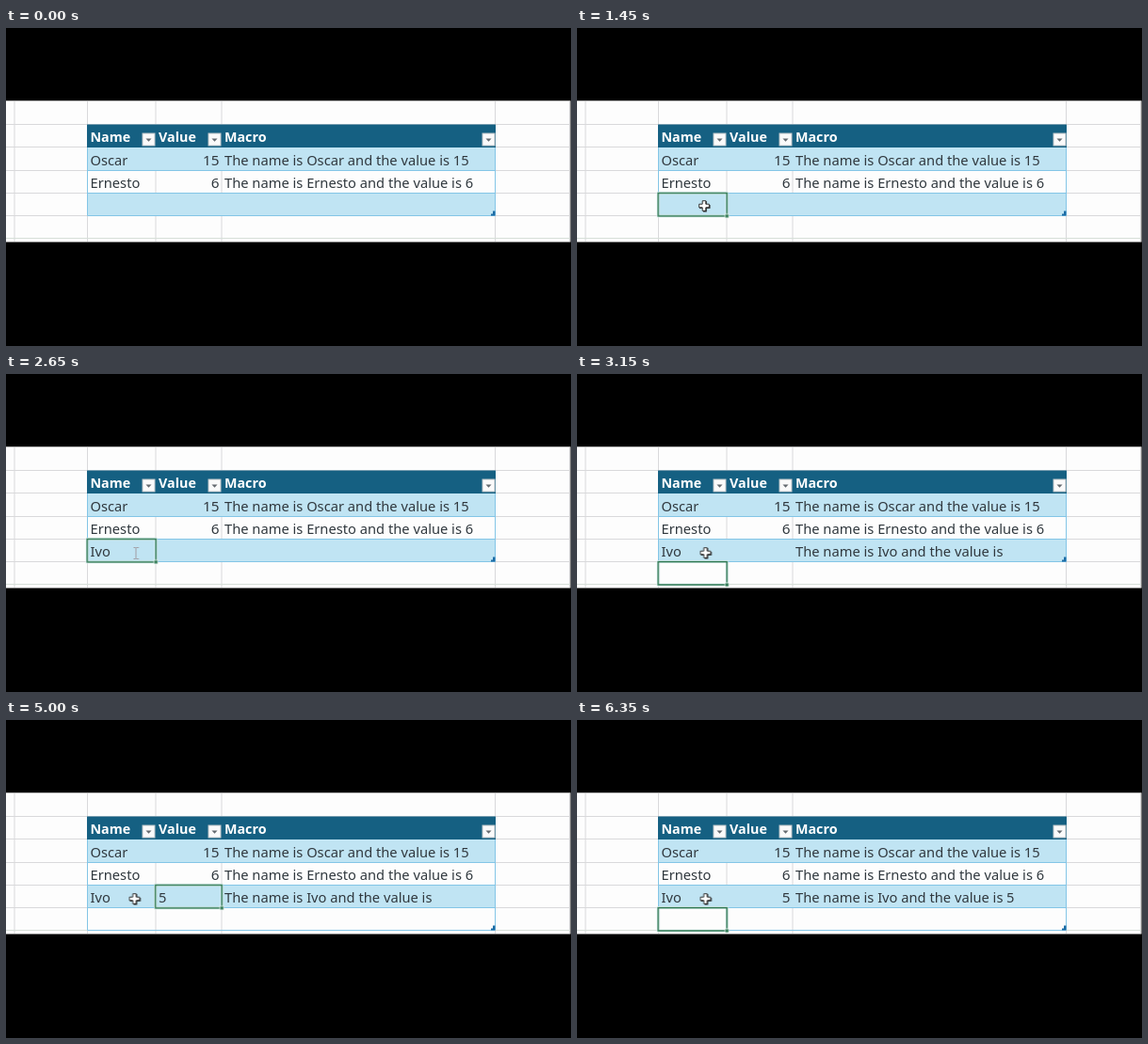
An HTML page that plays this animation: 600x338 px, repeating every 8 s.

```html
<!DOCTYPE html>
<html lang="en">
<head>
<meta charset="utf-8">
<title>Table with generated sentences</title>
<style>
  html, body { margin: 0; width: 100%; height: 100%; overflow: hidden; background: #000; }
  svg { display: block; }
  text { font: 14.7px "Noto Sans", "Open Sans", sans-serif; fill: #30383e; }
  .head text { font-size: 14.3px; font-weight: 700; fill: #fff; }
  .num { text-anchor: end; font-size: 15.3px; }
  .grid { stroke: #d9d9db; fill: none; }
  .edge { stroke: #83c5e6; fill: none; }

  .timed { animation: 8s step-end infinite; }
  #key1 { animation-name: key1; }
  #key2 { animation-name: key2; }
  #key3 { animation-name: key3; }
  #line { animation-name: line; }
  #digit { animation-name: digit; }
  #result { animation-name: result; }
  #short { animation-name: short; }
  #grown { animation-name: grown; }
  #cross { animation-name: cross; }
  #beam { animation-name: beam; }
  #mark { animation-name: mark; }

  @keyframes key1 { 0% { opacity: 0 } 26.875%, 100% { opacity: 1 } }
  @keyframes key2 { 0% { opacity: 0 } 28.75%, 100% { opacity: 1 } }
  @keyframes key3 { 0% { opacity: 0 } 30.625%, 100% { opacity: 1 } }
  @keyframes line { 0% { opacity: 0 } 34.375%, 100% { opacity: 1 } }
  @keyframes digit { 0% { opacity: 0 } 61.875% { opacity: 1 } 64.375%, 100% { opacity: 0 } }
  @keyframes result { 0% { opacity: 0 } 64.375%, 100% { opacity: 1 } }
  @keyframes short { 0% { opacity: 1 } 40.625%, 100% { opacity: 0 } }
  @keyframes grown { 0% { opacity: 0 } 40.625%, 100% { opacity: 1 } }
  @keyframes cross { 0% { opacity: 0 } 14.375% { opacity: 1 } 26.875% { opacity: 0 } 34.375%, 100% { opacity: 1 } }
  @keyframes beam { 0% { opacity: 0 } 26.875% { opacity: 1 } 34.375%, 100% { opacity: 0 } }
  @keyframes mark { 0% { opacity: 0 } 17.5%, 100% { opacity: 1 } }

  #pointer { animation: point 8s ease-out infinite; }
  @keyframes point {
    0%, 14.375% { transform: translate(196px, 216px) }
    17.5%, 18.75% { transform: translate(135px, 189px) }
    21.875%, 100% { transform: translate(136.5px, 190px) }
  }

  /* The selection hangs from its bottom right corner. */
  #cell { animation: move 8s cubic-bezier(.2, .6, .4, 1) infinite; }
  #cell .box { animation: size 8s cubic-bezier(.2, .6, .4, 1) infinite; }
  @keyframes move {
    0%, 34.375% { transform: translate(159.2px, 199.8px) }
    36.875%, 43.75% { transform: translate(159.2px, 224px) }
    46.375%, 46.75% { transform: translate(159.2px, 199.8px) }
    49.375%, 64.375% { transform: translate(229.2px, 199.8px) }
    66.875%, 76.25% { transform: translate(229.2px, 224px) }
    79.375%, 100% { transform: translate(159.2px, 224px) }
  }
  @keyframes size {
    0%, 46.75% { x: -73px; width: 73px }
    49.375%, 76.25% { x: -70.5px; width: 70.5px }
    79.375%, 100% { x: -73px; width: 73px }
  }
</style>
</head>
<body>
<svg width="600" height="338">
  <defs>
    <g id="filter">
      <rect x="-6.500" y="-6.500" width="13" height="13" fill="#fafafa" stroke="#bcc3c8"/>
      <path d="M-3-1H3L0 2.200Z" fill="#656b70"/>
    </g>
    <path id="corner" d="M515 199.500V197.500H517V194.500H519.500V199.500Z" fill="#1c6ca5"/>
  </defs>

  <rect y="77.300" width="599.500" height="150.200" fill="#fdfdfd"/>
  <path class="grid" d="M0 102.500H599M0 126.500H599M0 151.500H599M0 175.500H599M0 199.500H599M9 78V227M86.500 78V227M159 78V227M229 78V227M519.500 78V227M598.500 78V227"/>
  <path d="M0 223.500H599" stroke="#d6dfd8"/>

  <g class="head">
    <rect x="86" y="102.500" width="434" height="24.700" fill="#156082"/>
    <text x="89.500" y="121.400">Name</text>
    <text x="162" y="121.400">Value</text>
    <text x="232" y="121.400">Macro</text>
    <use href="#filter" x="151.500" y="118.500"/>
    <use href="#filter" x="221.500" y="118.500"/>
    <use href="#filter" x="512.500" y="118.500"/>
  </g>

  <path d="M86 127H520V151H86ZM86 175H520V199H86Z" fill="#c0e4f3"/>
  <path class="edge" d="M86.500 127V199.500H519.500V127M86 151.500H520M86 175.500H520"/>
  <use id="short" class="timed" href="#corner"/>
  <g id="grown" class="timed">
    <path class="edge" d="M86.500 199V223.500H519.500V199"/>
    <use href="#corner" y="24"/>
  </g>

  <text x="89.500" y="145.500">Oscar</text>
  <text class="num" x="226.500" y="145.500">15</text>
  <text x="232" y="145.500">The name is Oscar and the value is 15</text>
  <text x="89.500" y="169.500">Ernesto</text>
  <text class="num" x="226.500" y="169.500">6</text>
  <text x="232" y="169.500">The name is Ernesto and the value is 6</text>

  <text x="89.500" y="193.700"><tspan id="key1" class="timed">I</tspan></text>
  <text id="key2" class="timed" x="94.500" y="193.700">v</text>
  <text id="key3" class="timed" x="102" y="193.700">o</text>
  <text id="line" class="timed" x="232" y="193.700">The name is Ivo and the value is</text>
  <text id="digit" class="timed" x="162" y="193.700">5</text>
  <g id="result" class="timed">
    <text class="num" x="226.500" y="193.700">5</text>
    <text x="456" y="193.700">5</text>
  </g>

  <g id="mark" class="timed">
    <g id="cell" fill="none">
      <rect class="box" y="-24.400" height="24.400" stroke="#e4f3f5" stroke-width="3"/>
      <rect class="box" y="-24.400" height="24.400" stroke="#2b7750" stroke-width="1.500"/>
      <rect x="-2" y="-2" width="4" height="4" fill="#2b7750" stroke="#eef6f3" stroke-width=".8"/>
    </g>
  </g>

  <g id="pointer">
    <g id="cross" class="timed">
      <path d="M-1-5H2.700V-1H6.500V2.700H2.700V6.500H-1V2.700H-5V-1H-1Z" fill="#222"/>
      <path d="M-1.800-5.300H1.800V-1.800H5.300V1.800H1.800V5.300H-1.800V1.800H-5.300V-1.800H-1.800Z" fill="#fff" stroke="#222" stroke-width=".9"/>
    </g>
    <path id="beam" class="timed" d="M-1-5.500H1.500M2-5.500H4.500M1.500-5V6M-1 6.500H1.500M2 6.500H4.500" stroke="#a19da3" fill="none"/>
  </g>
</svg>
</body>
</html>
```
